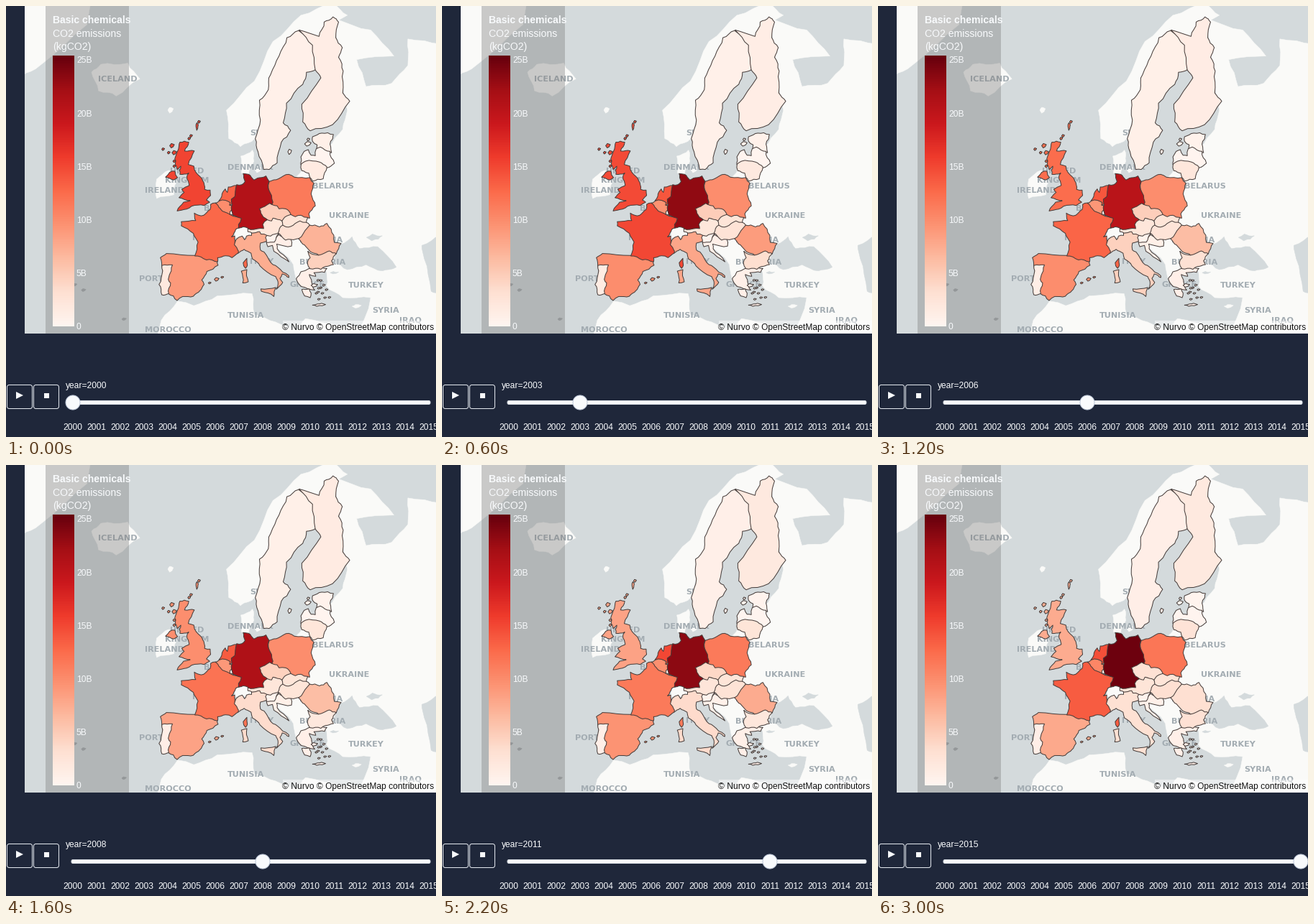
Animation, 598 px wide and 600 px high, one loop 3200 ms. Source, as a matplotlib script:

```python
import matplotlib.pyplot as plt
import numpy as np
from matplotlib.animation import FuncAnimation
from matplotlib.patches import Circle, FancyBboxPatch, Polygon, Rectangle

W, H, DPI = 598, 600, 100
PX = 72 / DPI
NAVY, SEA, LAND = "#1f273a", "#d4dadc", "#fafaf8"
EDGE, LABEL, WHITE = "#443c3a", "#a3acb2", "#f8fafc"
YEARS = np.arange(2000, 2016)
KEY_YEARS = [2000, 2003, 2006, 2009, 2011, 2014, 2015]
TOP = 25.4  # billions of kg at the upper end of the colour scale
REDS = plt.get_cmap("Reds")
rng = np.random.default_rng(4)

fig = plt.figure(figsize=(W / DPI, H / DPI), dpi=DPI, facecolor=NAVY)
ax = fig.add_axes([0, 0, 1, 1])
ax.axis("off")


def project(flat):
    """Web Mercator: flat lon/lat list to stage pixels."""
    lon, lat = np.reshape(flat, (-1, 2)).T
    return np.column_stack([274.2 + 6.47 * lon,
                            660 - 370.7 * np.arcsinh(np.tan(np.radians(lat)))])


def roughen(ring, levels=2):
    """Midpoint displacement turns a coarse ring into a natural outline."""
    for _ in range(levels):
        step = np.roll(ring, -1, axis=0) - ring
        length = np.hypot(*step.T)
        shift = rng.uniform(-0.12, 0.12, len(ring)) * (length > 5)
        shift *= np.minimum(1, 13 / np.maximum(length, 1))
        normal = np.column_stack([-step[:, 1], step[:, 0]])
        mid = ring + step / 2 + normal * shift[:, None]
        ring = np.stack([ring, mid], axis=1).reshape(-1, 2)
    return ring


def islet(lon, lat, w=0.3, h=0.15):
    """Small five-cornered island."""
    return [lon - w, lat, lon - w / 4, lat + h, lon + w, lat + h / 2,
            lon + w / 2, lat - h / 2, lon - w / 3, lat - h]


def land(flat, color=LAND):
    ax.add_patch(Polygon(roughen(project(flat)), fc=color, ec=color, lw=PX / 2, zorder=1))


regions = []


def region(values, *rings):
    """Coloured country. Later ones cover the hidden coarse edges of earlier ones."""
    patches = [ax.add_patch(Polygon(roughen(project(r)), fc=LAND, ec=EDGE, lw=PX,
                                    joinstyle="round", zorder=3)) for r in rings]
    n = len(values)
    keys = KEY_YEARS if n == len(KEY_YEARS) else np.linspace(YEARS[0], YEARS[-1], n)
    regions.append((patches, np.interp(YEARS, keys, values)))


def rect(x, y, w, h, color, z, alpha=1):
    ax.add_patch(Rectangle((x, y), w, h, fc=color, ec="none", alpha=alpha, zorder=z))


def rounded(x, y, w, h, r, fc, ec):
    ax.add_patch(FancyBboxPatch((x, y), w, h, fc=fc, ec=ec, lw=PX, zorder=7,
                                boxstyle=f"round,pad=0,rounding_size={r}"))


def text(x, y, s, size=12, color=WHITE, z=8, **kw):
    kw.setdefault("family", "Liberation Sans")
    return ax.text(x, y + 0.36 * size, s, fontsize=size * PX, color=color,
                   va="baseline", zorder=z, **kw)


# Base map: Eurasia, Africa, Norway, Greenland, Iceland, Ireland, Denmark, inland seas
rect(26, 0, W - 26, 456, SEA, 0)
land([28, 70, 36, 69.1, 41, 67, 33, 66.7, 35, 64.3, 40.5, 64.6, 44, 66.2, 44, 68.4, 51, 68,
      51, 29, 33, 29, 36, 36.5, 30, 36.5, 26.5, 38.5, 26.5, 41, 20, 39.7, 19.4, 42,
      14.5, 45.5, 6.8, 46.2, 7.2, 47.4, 15, 50, 19.6, 54.4, 21.1, 55.3, 27, 58, 30, 60, 31, 62])
land([-10, 29, -9, 32.5, -5.5, 35.9, -2, 35.1, 3, 36.8, 10.5, 37.2, 11, 33.5, 15.5, 32.2,
      20, 30.6, 22, 32.8, 30, 31.3, 34.4, 31.3, 34.4, 29])
land([11.1, 59, 8, 58.1, 5.5, 59, 5, 62, 11, 64.8, 15, 68.2, 21, 70.2, 28, 71.1, 31, 70.2,
      25, 68.6, 17, 67.5, 12.5, 61])
land([-40, 74, -22, 74, -25, 69.5, -36, 65.9, -40, 65])
land([-24, 65.6, -22, 66.3, -16.2, 66.4, -13.6, 65, -18.7, 63.4, -22.5, 63.9])
land([-10, 51.7, -6.3, 52.2, -5.6, 54.5, -7.3, 55.3, -10, 54.2])
land([8.2, 55, 8.1, 57, 10.6, 57.7, 10.9, 56.4, 9.8, 54.8])
land(islet(11.8, 55.4, 0.8, 0.4))
land(islet(33, 35, 1, 0.3))
land(islet(-7, 62, 0.6, 0.3))
land([28, 42.5, 31, 41.2, 35, 42, 38.5, 41, 41.5, 41.6, 37.5, 44.8, 33.6, 44.5, 32, 46.3,
      29.7, 45.2], SEA)
land(islet(36.8, 46.2, 1.7, 0.5), SEA)
land(islet(28.2, 40.7, 0.9, 0.2), SEA)
land([47.5, 43, 47, 45, 51, 46.5, 51, 37, 49, 37.6], SEA)
for spot in ((-27.6, 38.7), (-25.7, 37.8), (-17, 32.7)):
    land(islet(*spot, 0.5, 0.25), "#a0a6a8")

for x, y, name in ((155, 101, "ICELAND"), (367, 176, "SWEDEN"), (340, 224, "DENMARK"),
                   (252, 229, "UNITED"), (252, 242, "KINGDOM"), (220, 256, "IRELAND"),
                   (303, 281, "BELGIUM"), (284, 322, "FRANCE"), (219, 379, "PORTUGAL"),
                   (356, 355, "ITALY"), (419, 387, "GREECE"), (440, 356, "BULGARIA"),
                   (438, 325, "ROMANIA"), (455, 250, "BELARUS"), (477, 291, "UKRAINE"),
                   (501, 388, "TURKEY"), (334, 430, "TUNISIA"), (225, 450, "MOROCCO"),
                   (528, 423, "SYRIA"), (562, 436, "IRAQ")):
    text(x, y, name, 11.3, LABEL, 2, ha="center", weight="bold", family="DejaVu Sans")

# Sweden, Finland, Estonia, Latvia
region([.7, 1],
       [11.2, 59, 12.3, 61, 12.1, 63, 14, 64, 14.5, 65.4, 16.3, 67, 18, 68.5, 20.5, 69.05,
        24, 68, 24.3, 65.9, 22.2, 65.6, 21.4, 64.5, 17.9, 62.7, 17.2, 60.7, 18.8, 59.9,
        16.8, 58.6, 15.9, 56.2, 14.2, 55.4, 13, 55.4, 11.8, 57.5],
       islet(18.6, 57.5, 0.4, 0.3))
region([1.2, 1.2, 1.8, 1.8],
       [20.6, 69.1, 24.9, 68.6, 26, 69.7, 27.9, 70.08, 29.1, 69.7, 28.5, 68.5, 29.9, 67.7,
        29.1, 66.9, 30.1, 65.7, 30, 63.7, 31.5, 62.9, 27.8, 60.5, 23, 59.85, 21.4, 60.8,
        21.2, 62.6, 25.3, 65.1, 24.1, 65.8, 23.5, 67.9])
region([.8, .2],
       [24.4, 57.9, 24.5, 58.3, 23.5, 58.7, 23.5, 59.2, 25.5, 59.6, 28, 59.45, 27.4, 58.7,
        27.6, 57.4],
       islet(22.5, 58.4, 0.7, 0.25), islet(22.6, 58.9))
region([.1],
       [21, 56, 21, 56.9, 21.7, 57.55, 22.6, 57.75, 23.2, 57.1, 24.1, 57.05, 24.3, 57.85,
        25.2, 58.05, 27.3, 57.55, 28.2, 56.15, 26.6, 55.6])

# Spain, Portugal, Italy, France, Netherlands, Belgium
region([9, 10, 10, 7.5, 9.5, 9.2, 7.8],
       [-8.9, 41.8, -9.2, 43.1, -7.9, 43.75, -1.8, 43.45, 1, 43.1, 3, 42.6, 3.2, 41.9,
        .8, 40.9, -.3, 39.5, .2, 38.75, -.7, 37.7, -2.1, 36.75, -4.4, 36.7, -5.6, 36,
        -6.4, 36.8, -7.5, 37.2, -8, 39],
       islet(2.9, 39.6, 0.5, 0.3), islet(1.4, 39), islet(4.1, 39.95))
region([1.8, 1, 1],
       [-8.87, 41.87, -6.6, 41.95, -6.85, 41, -7.5, 39.6, -7, 39, -7.4, 37.2, -8.9, 37,
        -9.5, 38.75, -8.7, 41])
region([7.5, 8, 4.5, 3, 3.6, 3.5, 3.1],
       [7.5, 43.8, 8.8, 44.4, 10.3, 43.8, 10.6, 42.9, 12.2, 41.8, 15.6, 40.05, 16.1, 38.9,
        15.7, 37.95, 17.1, 39.1, 16.5, 39.75, 17, 40.5, 18.4, 39.9, 18.4, 40.2, 16, 41.6,
        15, 42, 13.6, 43.5, 12.3, 44.3, 12.3, 45.35, 13.7, 45.65, 13.9, 46.4, 12.2, 47.2,
        10.4, 46.9, 10.4, 46.5, 9.3, 46.4, 8.9, 45.85, 8.4, 46.4, 7.1, 45.9, 6.4, 45],
       [12.4, 38, 15.6, 38.25, 15.2, 36.7, 12.5, 37.6],
       [8.2, 40.95, 9.4, 41.2, 9.7, 39.2, 8.5, 39])
region([12.8, 15, 13, 11.5, 11.5, 13.7, 13.6],
       [-1.8, 43.37, -1.1, 45.5, -2.1, 46.8, -4.7, 47.9, -4.7, 48.5, -1.6, 48.65, -1.9, 49.7,
        .1, 49.4, 1.5, 50.2, 1.6, 50.9, 2.6, 51.1, 4.5, 50.2, 5.8, 49.5, 8.4, 49.05,
        7.8, 47.6, 7, 47.4, 6.1, 46.3, 6.8, 46.4, 6.7, 45.1, 7.6, 44.1, 7.5, 43.8, 6.2, 43.1,
        4.8, 43.4, 3.1, 43.1, 3.1, 42.45, .7, 42.75],
       [9.4, 43, 9.5, 41.9, 9.1, 41.4, 8.6, 42.3])
region([13, 14, 14, 13.5, 15, 14.3, 14.5],
       [3.4, 51.4, 4, 52, 4.75, 52.95, 5.2, 52.5, 5.4, 53.2, 7.1, 53.4, 7.3, 52.5, 6.2, 51,
        5.7, 50.75])
region([10, 9, 10.5],
       [2.6, 51.08, 3.4, 51.35, 4.8, 51.45, 5.8, 51.15, 5.65, 50.8, 6.3, 50.7, 6.1, 50.1,
        5.8, 49.5, 4.85, 49.8, 4.15, 49.97, 3.2, 50.75])
region([0], [6.1, 50.1, 5.75, 49.9, 5.8, 49.5, 6.4, 49.5])

# United Kingdom
region([15.2, 14.8, 12.5, 8.5, 8.3, 7.5, 7.6],
       [-5, 58.6, -3.1, 58.6, -4, 57.6, -1.9, 57.6, -3.2, 56, -2, 55.8, -1.5, 55, -.1, 54,
        .3, 52.9, 1.5, 52.8, 1.6, 52.1, .7, 51.5, 1.4, 51.2, .2, 50.75, -2.5, 50.65,
        -3.6, 50.25, -5.6, 50, -4.2, 51.2, -2.8, 51.4, -5.2, 51.8, -4.1, 52.5, -4.6, 52.9,
        -3, 53.4, -3.5, 54.5, -3.1, 54.95, -5, 54.8, -4.8, 55.8, -5.6, 55.4, -6.1, 56.7,
        -5.2, 58.2],
       [-7.2, 55.05, -6.1, 55.2, -5.5, 54.4, -6.3, 54.1, -8.1, 54.45],
       islet(-6.7, 58.2, 0.5, 0.25), islet(-6.2, 57.4, 0.5, 0.25), islet(-7.4, 57.4),
       islet(-6.2, 56.4), islet(-6.2, 55.8), islet(-8.6, 57.8), islet(-3, 59),
       islet(-2.6, 59.3), islet(-1.3, 60.3, 0.25, 0.4), islet(-0.9, 60.8))

# Poland, Lithuania, Austria, Czechia, Slovakia
region([11.5, 10, 10, 10, 11.5, 11.5, 11.8],
       [14.2, 53.9, 16.2, 54.25, 18.4, 54.8, 19.6, 54.45, 22.9, 54.4, 23.8, 53.7, 23.2, 52.3,
        23.6, 51.5, 24.1, 50.7, 22.7, 49.6, 22.9, 49, 19, 49, 17, 50, 14.6, 50.8, 14, 52])
region([1.5, 2.3, 2.7],
       [21.05, 56.05, 22, 56.4, 25, 56.3, 26.6, 55.7, 25.8, 54.25, 23.5, 53.95, 22.7, 54.95,
        21.2, 55.25])
region([2.2, 2.5],
       [9.6, 47.53, 13.4, 48.8, 15, 49.1, 16.9, 48.9, 17.3, 47.8, 16.5, 46.8, 15, 46.4,
        13.7, 46.5, 12.4, 46.7, 12.15, 47.05, 10.5, 46.85, 9.6, 47.05])
region([4.8, 4.8, 4.2, 3],
       [14.8, 50.87, 15.9, 50.7, 16.3, 50.3, 17.7, 50.3, 18.85, 49.5, 17.5, 48.8, 16.95, 48.6,
        15, 49, 14.7, 48.6, 13.8, 48.77, 12.6, 49.3, 12, 50.3, 14, 51.1])
region([2.5],
       [16.95, 48.6, 17.2, 48.85, 18.85, 49.5, 19.8, 49.2, 21, 49.4, 22.5, 49.1, 22.15, 48.2,
        17.8, 47.5, 17.1, 48])

# Croatia, Slovenia, Romania, Hungary, Greece, Bulgaria
region([1, .7],
       [16.2, 46.6, 18.8, 46, 19, 44.9, 15.8, 45.2, 15.9, 44.5, 18.45, 42.45, 15.2, 44.1,
        14.9, 45, 13.9, 44.8, 13.6, 45.5, 15, 45.8])
region([.3],
       [13.7, 46.5, 14.5, 46.4, 16.3, 46.8, 15.7, 46.2, 15.3, 45.5, 13.6, 45.45, 13.4, 46.2])
region([7, 8.8, 6.2, 6, 7.6, 5, 3.2],
       [22.9, 48, 21.6, 47.2, 20.3, 46.15, 21.4, 45.2, 22.6, 44.4, 25, 43.4, 28.6, 43.7,
        29.65, 45.3, 28.2, 45.45, 28.1, 46.5, 26.6, 48.25, 25, 47.75])
region([3, 2.5, 3.2],
       [17.1, 48, 17.8, 47.75, 18.8, 47.8, 20.8, 48.6, 22.15, 48.4, 22.9, 48, 21.1, 46.3,
        18.8, 45.9, 17.7, 45.8, 16.1, 46.85, 16.4, 47.5])
aegean = zip(rng.uniform(24, 27.5, 12), rng.uniform(36.2, 39.6, 12))
region([.9],
       [20, 39.7, 21, 40.85, 24.5, 41.8, 26.6, 41.4, 26.1, 40.75, 23.8, 40.7, 24.2, 40.1,
        22.8, 40.4, 23.3, 39.2, 24, 37.8, 21.1, 38.4],
       [21.2, 37.9, 22.8, 38, 23.2, 37.3, 23, 36.5, 21.8, 36.8],
       islet(24.9, 35.2, 1.4, 0.2), islet(23.9, 38.6, 0.7, 0.3),
       *[islet(*spot) for spot in aegean])
region([4.5, 3.3, 3, 1.6, 2.1, 2.3, 3],
       [22.5, 44.1, 23, 43.8, 25.4, 43.6, 27.1, 44.15, 28.6, 43.75, 27.6, 42.6, 28, 42,
        26.3, 41.7, 25.3, 41.25, 22.95, 41.35, 22.4, 42.3, 23, 43.1])

# Germany
region([21, 23.3, 20.5, 21.8, 23.5, 23.2, 25.1],
       [8.6, 54.9, 9.8, 54.8, 10.9, 54.1, 12.5, 54.4, 13.5, 54.6, 14.2, 53.9, 14.1, 52.85,
        14.7, 52.1, 15, 51.2, 14.8, 50.87, 14.3, 51.05, 12.1, 50.3, 12.4, 49.7, 13.8, 48.77,
        12.8, 48.1, 13, 47.5, 10.2, 47.35, 8.6, 47.75, 7.6, 47.6, 7.6, 48.1, 8.2, 48.97,
        6.4, 49.4, 6.1, 50.1, 6.05, 51.6, 6.8, 51.95, 6.9, 52.6, 7.2, 53.5, 8.3, 53.5,
        9, 53.9, 8.7, 54.4])

# Colour bar panel
rect(55, 0, 116, 456, "#808080", 4, 0.4)
ax.imshow(np.linspace(1, 0, 256)[:, None], cmap=REDS, extent=(65, 95, 446, 69),
          aspect="auto", zorder=5, interpolation="bilinear")
ax.set_xlim(0, W)
ax.set_ylim(H, 0)
text(65, 19, "Basic chemicals", 14, weight="bold")
text(65, 37.5, "CO2 emissions", 14)
text(65, 55.5, "(kgCO2)", 14)
for v in range(0, 30, 5):
    text(98, 446 - v * 14.84, f"{v}B" if v else "0")

# Frame around the map and attribution
rect(0, 0, 26, H, NAVY, 6)
rect(0, 456, W, H - 456, NAVY, 6)
rect(385, 438, W - 385, 18, "white", 5, 0.5)
text(595, 447, "© Nurvo © OpenStreetMap contributors", color="#111111", ha="right")

# Buttons and slider
for x in (1.5, 38.5):
    rounded(x, 527.5, 35, 33, 3, "none", "#e3e8ee")
ax.add_patch(Polygon([(14, 537), (24, 542), (14, 547)], fc=WHITE, ec="none", zorder=7))
rect(52.5, 539, 7, 7, WHITE, 7)
rounded(91, 549.5, 499, 5, 2, WHITE, "#d9dfe6")
for i, year in enumerate(YEARS):
    text(93 + 33 * i, 586, str(year), ha="center")
caption = text(83, 528, "")
grip = ax.add_patch(Circle((93, 552), 10, fc=WHITE, ec="#bec8d9", lw=PX, zorder=9))


def update(i):
    for patches, values in regions:
        for p in patches:
            p.set_facecolor(REDS(float(values[i]) / TOP))
    caption.set_text(f"year={YEARS[i]}")
    grip.center = (93 + 33 * i, 552)
    return []


anim = FuncAnimation(fig, update, frames=len(YEARS), interval=200, repeat=True,
                     repeat_delay=0, blit=False)
plt.show()
```
